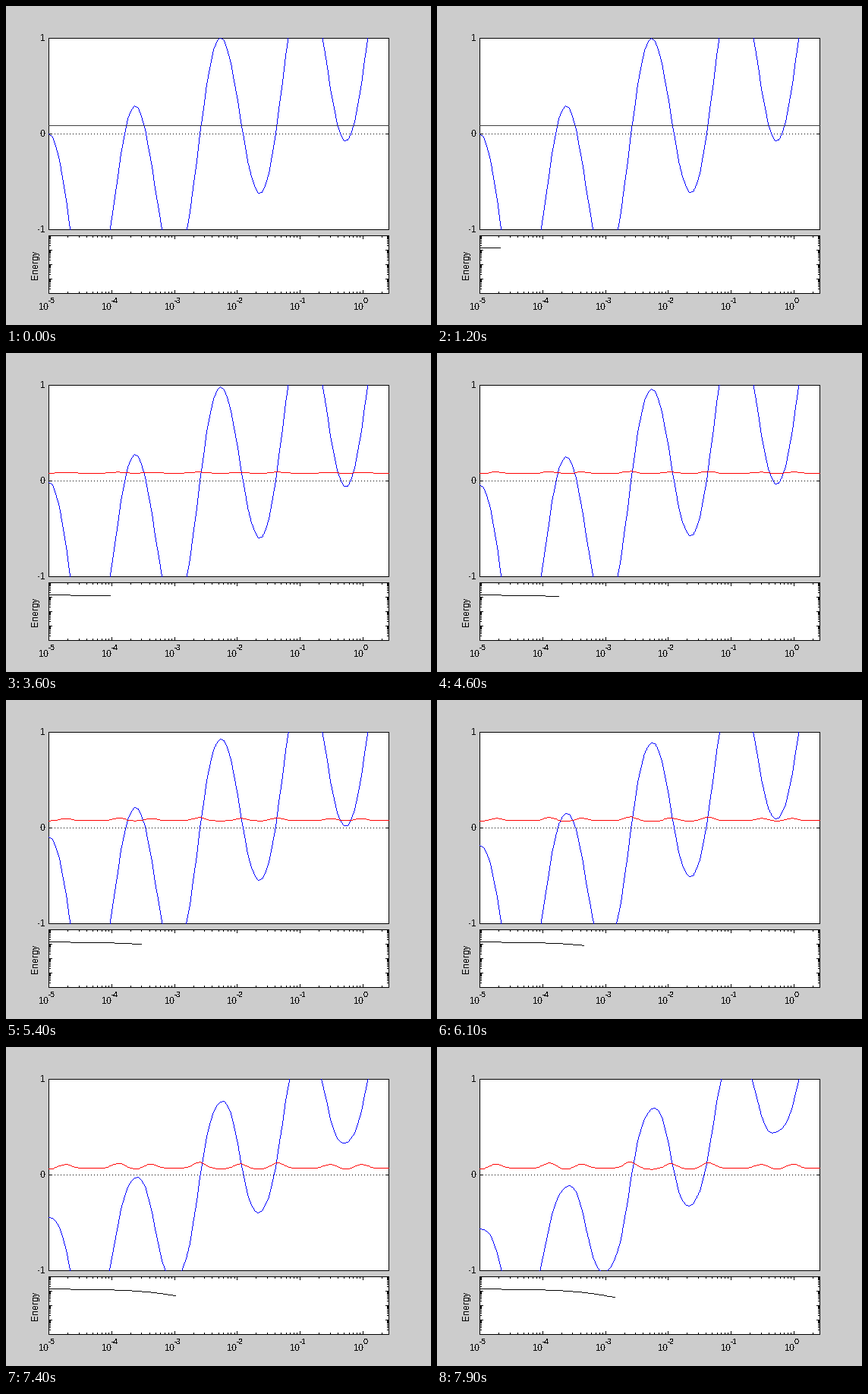
These frames come from a looping animation (560x420 px, 8 s). A matplotlib script:

```python
import numpy as np
import matplotlib.pyplot as plt
from matplotlib.animation import FuncAnimation
from matplotlib.collections import PolyCollection

W, H, DPI = 560, 420, 100
FRAMES, INTERVAL = 80, 100
LEFT, RIGHT = 56, 504
TOP, ZERO, BOTTOM = 42, 168, 294
E_TOP, E_BOTTOM = 302, 378
DECADES = 5.41
DECADE_W = (RIGHT - LEFT) / DECADES
STEPS = 199
RIPPLE_START = 30

plt.rcParams.update({
    "font.family": "Liberation Sans",
    "text.antialiased": False,
    "text.hinting": "native",
    "text.hinting_factor": 1,
})

fig = plt.figure(figsize=(W / DPI, H / DPI), dpi=DPI, facecolor="#cccccc")
ax = fig.add_axes([0, 0, 1, 1])
ax.set_xlim(0, W)
ax.set_ylim(H, 0)
ax.axis("off")


def box(x0, y0, x1, y1):
    """Corners of a block of whole pixels, both ends included."""
    return [(x0, y0), (x1 + 1, y0), (x1 + 1, y1 + 1), (x0, y1 + 1)]


def layer(color, zorder, blocks=()):
    blocks = PolyCollection(blocks, facecolors=color, edgecolors="none",
                            linewidths=0, snap=False, zorder=zorder)
    return ax.add_collection(blocks, autolim=False)


def trace(x, y, top=0, bottom=H):
    """One-pixel-wide polyline, cut to the given rows."""
    x, y = np.rint(x), np.rint(y)
    parts = []
    for x0, y0, x1, y1 in zip(x[:-1], y[:-1], x[1:], y[1:]):
        n = int(max(abs(x1 - x0), abs(y1 - y0))) + 1
        parts.append(np.column_stack([np.linspace(x0, x1, n),
                                      np.linspace(y0, y1, n)]))
    if not parts:
        return []
    dots = np.unique(np.rint(np.concatenate(parts)), axis=0)
    dots = dots[(dots[:, 1] >= top) & (dots[:, 1] <= bottom)]
    corners = np.array([(0, 0), (1, 0), (1, 1), (0, 1)])
    return dots[:, None, :] + corners


def label(x, y, text, size=12, **kw):
    ax.text(x, y, text, fontsize=size * 72 / DPI, **kw)


def frame(top, bottom):
    return [box(LEFT, top, RIGHT, top), box(LEFT, bottom, RIGHT, bottom),
            box(LEFT, top, LEFT, bottom), box(RIGHT, top, RIGHT, bottom)]


def x_ticks(x, size):
    x = round(x)
    return [box(x, E_BOTTOM - size, x, E_BOTTOM),
            box(x, E_TOP, x, E_TOP + size)]


def y_ticks(y, size):
    y = round(y)
    return [box(LEFT, y, LEFT + size, y), box(RIGHT - size, y, RIGHT, y)]


def draw_axes():
    layer("white", 0, [box(LEFT, TOP, RIGHT, BOTTOM),
                       box(LEFT, E_TOP, RIGHT, E_BOTTOM)])
    ink = frame(TOP, BOTTOM) + frame(E_TOP, E_BOTTOM)
    ink += [box(x, ZERO, x, ZERO) for x in range(LEFT, RIGHT, 4)]

    for y, text in ((TOP, "1"), (ZERO, "0"), (BOTTOM, "-1")):
        ink += y_ticks(y, 4)
        label(52, y + 4, text, ha="right", va="baseline")

    for k in range(6):
        x = LEFT + k * DECADE_W
        ink += x_ticks(x, 4)
        left = round(x) - 13 + (k == 5)
        label(left, 400, "10", va="baseline")
        label(left + 13, 391, str(k - 5), size=10, va="baseline")
        for m in range(2, 10):
            minor = x + np.log10(m) * DECADE_W
            if minor < RIGHT:
                ink += x_ticks(minor, 2)

    height = (E_BOTTOM - E_TOP) / 4
    for k in range(4):
        for m in range(1, 10):
            y = E_BOTTOM - (k + np.log10(m)) * height
            ink += y_ticks(y, 4 if m == 1 else 2)
    layer("black", 4, ink)
    label(39, 341.5, "Energy", rotation=90, ha="center", va="center")


s = np.linspace(0, 1, 100)
xs = LEFT + (RIGHT - LEFT) * s
wave, trend = np.cos(8 * np.pi * s), -np.cos(np.pi * s)
steepen = wave - np.cos(24 * np.pi * s)
edge = (np.abs(np.cos(np.pi * s)) ** 2.5
        - 0.17 * np.sin(4 * np.pi * s) * np.sin(np.pi * s) ** 2)


def bumps(centres, heights, width):
    return sum(h * np.exp(-((xs - c) / width) ** 2)
               for c, h in zip(centres, heights))


ripple = (bumps([77, 148, 190, 254, 308, 357, 427, 468],
                [6, 7.8, 6.2, 9.5, 7, 8.5, 6, 6.3], 11)
          - bumps([56, 170, 283, 333, 447], [1.6] * 5, 14) - 2)


def time_at(i):
    return 10 ** (-5 + DECADES * np.asarray(i) / STEPS)


def growth(t):
    return 1 - np.exp(-t / 6e-4)


def signal(t):
    """Wave that flattens faster toward both ends but keeps its steep flanks."""
    mid = 1 - np.exp(-280 * t)
    end = 1 - np.exp(-600 * t * (1 - np.exp(-t / 3.4e-4)))
    loss = mid + (end - mid) * edge
    return (1 - loss) * wave + 0.04 * growth(t) * steepen + trend


def energy_y(t):
    return 318.25 + 21 * (1 - np.exp(-540 * t))


draw_axes()
energy = layer("black", 5)
blue = layer("#0000ff", 5)
red = layer("#ff0000", 6)


def update(i):
    t = time_at(i)
    blue.set_verts(trace(xs, ZERO - 126 * signal(t), TOP, BOTTOM))

    rippling = i >= RIPPLE_START
    red.set_verts(trace(xs, 157.3 - rippling * growth(t) * ripple))
    red.set_facecolor("#ff0000" if rippling else "#404040")

    k = np.arange(i + 1)
    energy.set_verts(trace(LEFT + (RIGHT - LEFT) * k / STEPS,
                           energy_y(time_at(k))))
    return blue, red, energy


anim = FuncAnimation(fig, update, frames=FRAMES, interval=INTERVAL,
                     repeat=True, repeat_delay=0, blit=False)
plt.show()
```
